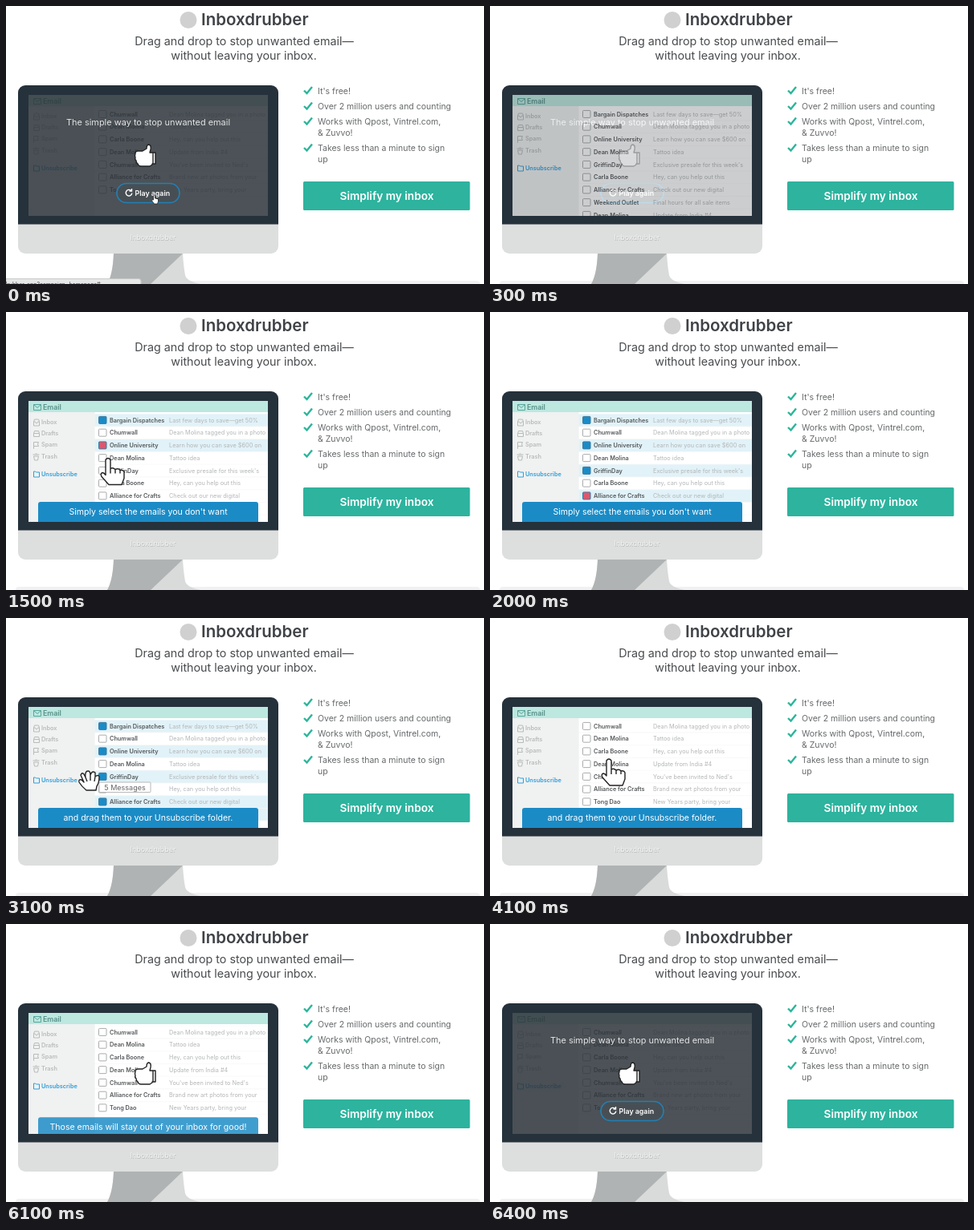
An HTML page that plays this animation: 595x347 px, repeating every 6500 ms.

```html
<!DOCTYPE html>
<html lang="en">
<head>
<meta charset="utf-8">
<title>Inboxdrubber</title>
<style>
html, body { margin: 0; width: 100%; height: 100%; overflow: hidden; background: #fff }
svg { display: block; font-family: Inter, "Open Sans", sans-serif }
.mid { text-anchor: middle }
.bold { font-weight: 600 }
.hand { fill: #fff; stroke: #222; stroke-width: 1.4; stroke-linejoin: round }
.icon { fill: none; stroke: #c4c4c4 }
</style>
</head>
<body>
<svg width="595" height="347" viewBox="0 0 595 347">
  <defs>
    <clipPath id="screen"><path d="M28 111H326V262H28z"/></clipPath>
    <clipPath id="case"><rect x="15" y="99" width="324" height="210" rx="9"/></clipPath>
  </defs>

  <circle cx="227" cy="17.500" r="10.500" fill="#d0d0d0"/>
  <text x="243" y="24" font-size="20.500" class="bold" fill="#3f4347">Inboxdrubber</text>
  <g class="mid" font-size="14.300" fill="#484b4e">
    <text x="296.500" y="49">Drag and drop to stop unwanted email—</text>
    <text x="296" y="67">without leaving your inbox.</text>
  </g>
  <g id="perks" font-size="10.500" fill="#66696b"></g>
  <rect x="370" y="219" width="207.500" height="36" rx="1.500" fill="#2db39e"/>
  <text x="474" y="242" font-size="13.650" class="mid bold" fill="#fff">Simplify my inbox</text>

  <rect x="12" y="343" width="578" height="10" rx="4" fill="#f1f1f1"/>
  <path d="M134 309H220Q221 325 223 336Q225 344 243 347H126Q133 335 134 309z" fill="#d9dada"/>
  <path d="M134 309H220L180 347H126Q133 335 134 309z" fill="#b0b3b3"/>
  <g clip-path="url(#case)">
    <path d="M15 98H339V273H15z" fill="#25313b"/>
    <path d="M15 272.500H339V310H15z" fill="#dddede"/>
  </g>
  <g class="mid" font-size="9">
    <text x="183.500" y="292.500" fill="#b9bbbb">Inboxdrubber</text>
    <text x="183" y="292" fill="#f2f2f2">Inboxdrubber</text>
  </g>

  <g clip-path="url(#screen)">
    <path d="M28 110H326V262H28z" fill="#fff"/>
    <g id="list" font-size="7.300"></g>
    <path d="M28 125H110.500V262H28z" fill="#f0f1f1"/>
    <path d="M28 110H326V125H28z" fill="#bce8e0"/>
    <path d="M34.500 115.500h9v7h-9zl4.500 4 4.500-4" fill="none" stroke="#5aa59b"/>
    <text x="46" y="122" font-size="8.800" class="bold" fill="#579088">Email</text>
    <g id="folders" font-size="7.300" class="bold"></g>

    <g id="label">
      <rect x="13" y="2" width="64" height="12.500" rx="1" fill="#fff" stroke="#b8b8b8"/>
      <text x="45" y="11.500" font-size="9" class="mid" fill="#666">5 Messages</text>
    </g>
    <path id="point" class="hand" d="M-3 19V2q3-4 6 0V13q3-2 6 1q4-2 6 1q4-1 5 2V25l-3 8H1L-8 23q-2-4 1-5q2 0 4 3zM3 13v6M9 14v5M15 15v4"/>
    <path id="grab" class="hand" d="M-12 2q-1-4 3-3l3 3l-4-9q2-4 4-1l2 4q-1-8 3-8q3 0 3 5q2-6 6-3v5q4-3 5 0q0 8-3 12l-1 5H-3q-6-5-9-10zM-4-4l2 5M2-7v7M8-5l-1 6"/>
    <g id="banner">
      <path d="M40 264V240q0-3 3-3H311q3 0 3 3V264z" fill="#1b8bc6"/>
      <text id="message" x="177" y="252.500" font-size="10.550" class="mid" fill="#fff"></text>
    </g>

    <g id="overlay">
      <path d="M28 110H326V262H28z" fill="#2d343a" fill-opacity=".85"/>
      <text x="177" y="148.500" font-size="10.950" class="mid" fill="#e2e3e4">The simple way to stop unwanted email</text>
      <rect x="138" y="221.500" width="78" height="24" rx="12" fill="#484f54" stroke="#227fb4" stroke-width="1.700"/>
      <path d="M155.500 230.300a3.800 3.800 0 1 0 1.300 3.200M156.500 228v3h-3" fill="none" stroke="#fff" stroke-width="1.400"/>
      <text x="160.500" y="236.700" font-size="8.800" class="bold" fill="#fff">Play again</text>
    </g>
    <path id="thumb" class="hand" d="M161 184q0-3 3-3h6l5-3q0-5 3-5q3 1 2 6l-1 4h7v14h-4v1l-3 2H168q-3 0-4-3q-2-1-2-4q-2-1-1-4q-1-2 0-5zM183 183v14"/>
    <path id="mouse" class="hand" style="stroke-width:.8" d="M183.500 241v-4q1-1.500 2 0v3l4 1v3l-1 3h-4l-3-4q0-2 2-1z"/>
  </g>
  <g id="status">
    <path d="M0 348V340.500H165q3 0 3 3V348z" fill="#e6e7e7" stroke="#c9c9c9"/>
    <text x="-3" y="349.500" font-size="6.900" fill="#444">drubber_app?campaign=homepage#</text>
  </g>
</svg>
<script>
const LOOP = 6500, PITCH = 15.75, BLUE = '#1b8bc6';
const $ = id => document.getElementById(id);
const ramp = (t, a, b) => Math.min(1, Math.max(0, (t - a) / (b - a)));
const show = (id, on) => $(id).setAttribute('opacity', +on);
const move = (el, x, y) => el.setAttribute('transform', `translate(${x} ${y})`);

// sender, subject, time of the click that selects it
const mails = [
  ['Bargain Dispatches', 'Last few days to save—get 50%', 1100],
  ['Chumwall', 'Dean Molina tagged you in a photo'],
  ['Online University', 'Learn how you can save $600 on', 1400],
  ['Dean Molina', 'Tattoo idea'],
  ['GriffinDay', "Exclusive presale for this week's", 1600],
  ['Carla Boone', 'Hey, can you help out this'],
  ['Alliance for Crafts', 'Check out our new digital', 1900],
  ['Weekend Outlet', 'Final hours for all sale items', 2200],
  ['Dean Molina', 'Update from India #4'],
  ['Chumwall', "You've been invited to Ned's"],
  ['Alliance for Crafts', 'Brand new art photos from your'],
  ['Tong Dao', 'New Years party, bring your']
];
$('list').innerHTML = mails.map(([who, what]) => `<g>
  <path d="M110 0H326V${PITCH}H110z" fill="#fff" stroke="#f4f4f4" stroke-width=".5"/>
  <rect x="115.500" y="3.200" width="9.500" height="9" rx="1"/>
  <text x="129" y="10.500" class="bold" fill="#55585a">${who}</text>
  <text x="203" y="10.500" fill="#b4b6b7">${what}</text></g>`).join('');
const rows = [...$('list').children];

$('folders').innerHTML = [['Inbox', 137], ['Drafts', 151.5], ['Spam', 165.5], ['Trash', 180], ['Unsubscribe', 202]]
  .map(([name, y], i) => {
    const ink = i == 4 ? '#2b9fdc' : '#b9bbbb';
    const shape = ['v5h7v-5l-1-3h-5zh2l1 2h1l1-2h2', 'h7v4h-7zl1-3h5l1 3', 'v5v-8h6l-1 2.500 1 2.500h-6', 'h6l-1 5h-4zm-1-2h8m-5-1h2', 'v4h7v-6h-4l-1-1h-2z'][i];
    return `<path class="icon" style="stroke:${ink}" d="M34.500 ${y}${shape}"/>
      <text x="44" y="${y + 2.6}" fill="${ink}">${name}</text>`;
  }).join('');

$('perks').innerHTML = [["It's free!", 109.5], ['Over 2 million users and counting', 129], ['Works with Qpost, Vintrel.com,', 148],
  ['& Zuvvo!', 162], ['Takes less than a minute to sign', 181], ['up', 195]]
  .map(([line, y], i) => `<text x="388" y="${y}">${line}</text>` + (i == 3 || i == 5 ? '' :
    `<path d="M371 ${y - 4}l3.500 3.500 6.500-8" fill="none" stroke="#2cb59b" stroke-width="2.400"/>`)).join('');

// text, start of the slide in, start of the slide out
const notes = [
  ["Simply select the emails you don't want", 360, 2450],
  ['and drag them to your Unsubscribe folder.', 2700, 4100],
  ['Those emails will stay out of your inbox for good!', 4350, 6060]
];
// time, x, y
const path = [[700, 127, 266], [1000, 127, 138], [1100, 127, 138], [1300, 127, 167], [1400, 127, 167],
  [1600, 127, 198], [1700, 127, 198], [1900, 127, 230], [2000, 127, 250], [2400, 127, 250],
  [2700, 135, 207], [2800, 135, 207], [3100, 103, 203], [3300, 82, 203], [3600, 82, 203], [3900, 148, 176], [4300, 148, 176]];

function cursorAt(t) {
  const i = path.findIndex(p => p[0] > t);
  if (i < 1) return path[i ? path.length - 1 : 0].slice(1);
  const [a, b] = [path[i - 1], path[i]], k = ramp(t, a[0], b[0]);
  return [1, 2].map(n => a[n] + (b[n] - a[n]) * k);
}

function draw(t) {
  const gone = t < 200 ? 1 : ramp(t, 3500, 3900);
  let y = 127.2;
  rows.forEach((row, i) => {
    const click = mails[i][2], on = t >= click;
    const [back, box] = row.children;
    move(row, 0, y);
    row.setAttribute('opacity', click ? 1 - gone : 1);
    back.setAttribute('fill', on ? '#e1f2f8' : '#fff');
    box.setAttribute('fill', on ? (t - click <= 100 ? '#e0566c' : BLUE) : '#fff');
    box.setAttribute('stroke', on ? '#3a7ba0' : '#a9abac');
    y += PITCH * (click ? 1 - gone : 1);
  });

  const note = notes.find(n => t < n[2] + 240) || notes[2];
  const hidden = Math.max(1 - ramp(t, note[1], note[1] + 240), ramp(t, note[2], note[2] + 240));
  $('message').textContent = note[0];
  move($('banner'), 0, 26 * hidden);
  show('banner', 1 - hidden);

  const [cx, cy] = cursorAt(t), grabbing = t >= 2700 && t < 3600;
  for (const id of ['point', 'grab', 'label']) move($(id), cx, cy);
  show('point', t >= 700 && t < 4300 && !grabbing);
  show('grab', grabbing);
  show('label', grabbing);

  const dim = Math.max(1 - ramp(t, 50, 400), ramp(t, 6100, 6400));
  show('overlay', dim);
  show('thumb', t >= 4300 ? 1 : dim);
  show('mouse', t < 200);
  show('status', t < 300);
}

function tick() {
  draw(Math.floor(performance.now() % LOOP / 100) * 100);
  requestAnimationFrame(tick);
}
tick();
</script>
</body>
</html>
```
